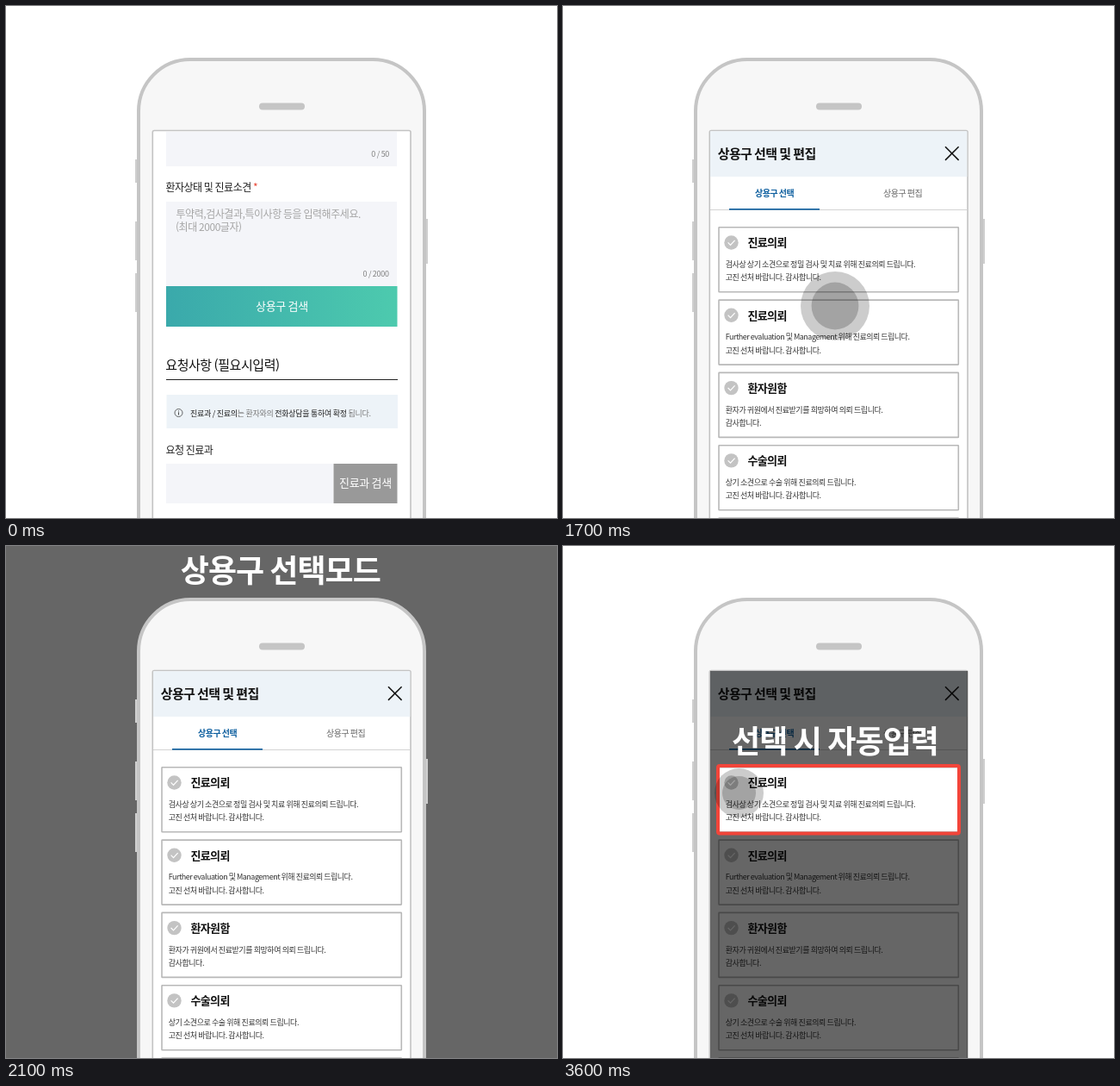
An HTML page with a canvas that plays this animation: 640 px wide and 594 px high, repeating every 5100 ms.

```html
<!DOCTYPE html>
<html lang="ko">
<head>
<meta charset="utf-8">
<title>상용구 검색</title>
<style>
html, body { margin: 0; width: 100%; height: 100%; overflow: hidden; background: #fff; }
canvas { display: block; width: 640px; height: 594px; }
</style>
</head>
<body>
<canvas id="stage"></canvas>
<script>
const W = 640, H = 594, LOOP = 5100;
const FONT = '"Noto Sans CJK KR", "Noto Sans CJK", "Noto Sans KR", sans-serif';
const GREY = '#c5c5c5', FIELD = '#f4f5f9', PALE = '#edf3f8', RED = '#f2453a';
const canvas = document.getElementById('stage');
const ctx = canvas.getContext('2d');
const dpr = window.devicePixelRatio || 1;
canvas.width = W * dpr;
canvas.height = H * dpr;

const CARDS = [
  ['진료의뢰', '검사상 상기 소견으로 정밀 검사 및 치료 위해 진료의뢰 드립니다.', '고진 선처 바랍니다. 감사합니다.'],
  ['진료의뢰', 'Further evaluation 및 Management 위해 진료의뢰 드립니다.', '고진 선처 바랍니다. 감사합니다.'],
  ['환자원함', '환자가 귀원에서 진료받기를 희망하여 의뢰 드립니다.', '감사합니다.'],
  ['수술의뢰', '상기 소견으로 수술 위해 진료의뢰 드립니다.', '고진 선처 바랍니다. 감사합니다.']
];

function rect(x, y, w, h, color) {
  ctx.fillStyle = color;
  ctx.fillRect(x, y, w, h);
}

function round(x, y, w, h, r) {
  ctx.beginPath();
  ctx.roundRect(x, y, w, h, r);
}

function disc(x, y, r, color) {
  ctx.beginPath();
  ctx.arc(x, y, r, 0, Math.PI * 2);
  ctx.fillStyle = color;
  ctx.fill();
}

function line(points, color, width) {
  ctx.beginPath();
  points.forEach(([x, y], i) => i ? ctx.lineTo(x, y) : ctx.moveTo(x, y));
  ctx.strokeStyle = color;
  ctx.lineWidth = width;
  ctx.stroke();
}

// Draws text and returns the x where it ends.
function text(str, x, y, size, color, weight = 400, track = 0) {
  ctx.font = `${weight} ${size}px ${FONT}`;
  ctx.letterSpacing = track + 'px';
  ctx.fillStyle = color;
  ctx.fillText(str, x, y);
  return x + ctx.measureText(str).width;
}

function faded(alpha, draw) {
  if (alpha <= 0) return;
  ctx.save();
  ctx.globalAlpha = alpha;
  draw();
  ctx.restore();
}

function redFrame(x, y, w, h) {
  round(x, y, w, h, 2);
  ctx.strokeStyle = RED;
  ctx.lineWidth = 4;
  ctx.stroke();
}

function touch(x, y, r, alpha) {
  faded(alpha, () => {
    disc(x, y, r, 'rgba(0,0,0,.2)');
    disc(x, y, r * 0.685, 'rgba(0,0,0,.2)');
  });
}

function phone() {
  for (const [y, h] of [[178, 27], [250, 45], [310, 45]]) rect(150, y, 4, h, '#cfcfcf');
  rect(486, 247, 4, 52, '#cfcfcf');
  round(154, 62, 332, 640, 60);
  ctx.fillStyle = '#f7f7f7';
  ctx.fill();
  ctx.strokeStyle = GREY;
  ctx.lineWidth = 4;
  ctx.stroke();
  round(294, 112.5, 53, 8, 4);
  ctx.fillStyle = GREY;
  ctx.fill();
  round(170.3, 144.5, 299.7, 500, 2);
  ctx.fillStyle = '#fff';
  ctx.fill();
  ctx.strokeStyle = '#c3c3c3';
  ctx.lineWidth = 1.6;
  ctx.stroke();
}

function form() {
  rect(186, 146, 268, 40, FIELD);
  text('0 / 50', 424.3, 175, 9, '#808080', 400, -0.3);

  const end = text('환자상태 및 진료소견 ', 185.5, 215, 12, '#222', 400, -0.5);
  text('*', end, 215, 12, '#e8412f', 400);
  rect(186, 227, 268, 98, FIELD);
  text('투약력,검사결과,특이사항 등을 입력해주세요.', 197.5, 246, 12, '#a5a5a5', 300, -0.45);
  text('(최대 2000글자)', 197, 261, 12, '#a5a5a5', 300, -0.45);
  text('0 / 2000', 414.5, 314, 9, '#808080', 400, -0.3);

  const g = ctx.createLinearGradient(186, 0, 454, 0);
  g.addColorStop(0, '#3aa9ab');
  g.addColorStop(1, '#4dcaae');
  rect(186, 325, 268.5, 47, g);
  text('상용구 검색', 290, 353, 13, '#fff', 500, -0.3);

  text('요청사항 (필요시입력)', 185.3, 422, 15, '#111', 500, -0.45);
  rect(186, 433, 269, 1, '#222');

  rect(186.5, 451, 268.5, 39, PALE);
  ctx.beginPath();
  ctx.arc(200.5, 472, 4.5, 0, Math.PI * 2);
  ctx.strokeStyle = '#555';
  ctx.lineWidth = 0.9;
  ctx.stroke();
  rect(200, 471.3, 1, 3.2, '#444');
  rect(200, 469.4, 1, 1, '#444');
  let x = 214;
  for (const [s, color, weight] of [
    ['진료과 / 진료의', '#222', 500], ['는 환자와의 ', '#777', 300],
    ['전화상담을 통하여 확정', '#222', 500], [' 됩니다.', '#777', 300]
  ]) x = text(s, x, 475.5, 9, color, weight, -0.28);

  text('요청 진료과', 185.5, 519.5, 12, '#222', 400, -0.5);
  rect(186, 531, 194, 46, FIELD);
  rect(380.5, 531, 74, 46, '#999');
  text('진료과 검색', 387, 558, 13, '#fff', 400, -0.3);
}

function card(i) {
  const y = 256.8 + i * 84.3;
  round(181, y, 278.3, 75, 0.5);
  ctx.fillStyle = '#fff';
  ctx.fill();
  ctx.strokeStyle = '#b8b8b8';
  ctx.lineWidth = 1.6;
  ctx.stroke();
  if (!CARDS[i]) return;
  const [head, first, second] = CARDS[i];
  disc(195.5, y + 17.7, 8.2, '#c3c3c3');
  line([[191.6, y + 17.6], [194.5, y + 20.5], [199.6, y + 15]], '#fff', 1.2);
  text(head, 214.5, y + 22.5, 13, '#111', 700, -0.65);
  text(first, 188.7, y + 46.3, 9, '#333', 400, /^F/.test(first) ? -0.5 : -0.43);
  text(second, 188.7, y + 61.5, 9, '#333', 400, -0.43);
}

function list() {
  rect(171, 145.3, 298.3, 52.7, PALE);
  text('상용구 선택 및 편집', 179.7, 177, 15, '#111', 700, -0.6);
  line([[444, 163.3], [459.6, 178.9]], '#111', 1.5);
  line([[459.6, 163.3], [444, 178.9]], '#111', 1.5);
  text('상용구 선택', 223, 221, 10, '#0d5f9f', 700, -0.5);
  text('상용구 편집', 372, 221, 10, '#666', 500, -0.5);
  rect(171, 236, 298.3, 1, '#d3d3d3');
  rect(193, 235, 105, 1.6, '#0d5f9f');
  for (let i = 0; i < 5; i++) card(i);
}

function picked() {
  rect(171, 145, 299, 449, 'rgba(0,0,0,.6)');
  card(0);
  redFrame(180, 255, 280, 78.5);
  text('선택 시 자동입력', 196, 239.7, 36, '#fff', 700, -0.9);
  touch(204.5, 286.5, 28.5, 1);
}

// Progress in equal 100 ms steps; the first step is already visible at start.
function steps(t, start, count) {
  if (t < start) return 0;
  return Math.min(1, (Math.floor((t - start) / 100) + 1) / count);
}

function draw(t) {
  ctx.setTransform(dpr, 0, 0, dpr, 0, 0);
  rect(0, 0, W, H, '#fff');

  const dim = steps(t, 1900, 3) - steps(t, 2900, 2);
  faded(dim, () => {
    rect(0, 0, W, H, 'rgba(0,0,0,.6)');
    text('상용구 선택모드', 202.8, 41.5, 36, '#fff', 700, -1);
  });
  phone();

  const press = steps(t, 1100, 5);
  if (t < 1700) {
    form();
    const blink = t >= 500 && t < 700 || t >= 900;
    if (blink) faded(1 - press, () => redFrame(184, 323, 273, 51));
  } else {
    list();
  }

  if (t >= 3600) {
    picked();
  } else {
    const move = steps(t, 3200, 2);
    touch(316 - 100 * move, 348 - 60 * move, 40, press - dim);
  }
}

const begin = performance.now();
function tick() {
  draw((performance.now() - begin) % LOOP);
  requestAnimationFrame(tick);
}
tick();
</script>
</body>
</html>
```
